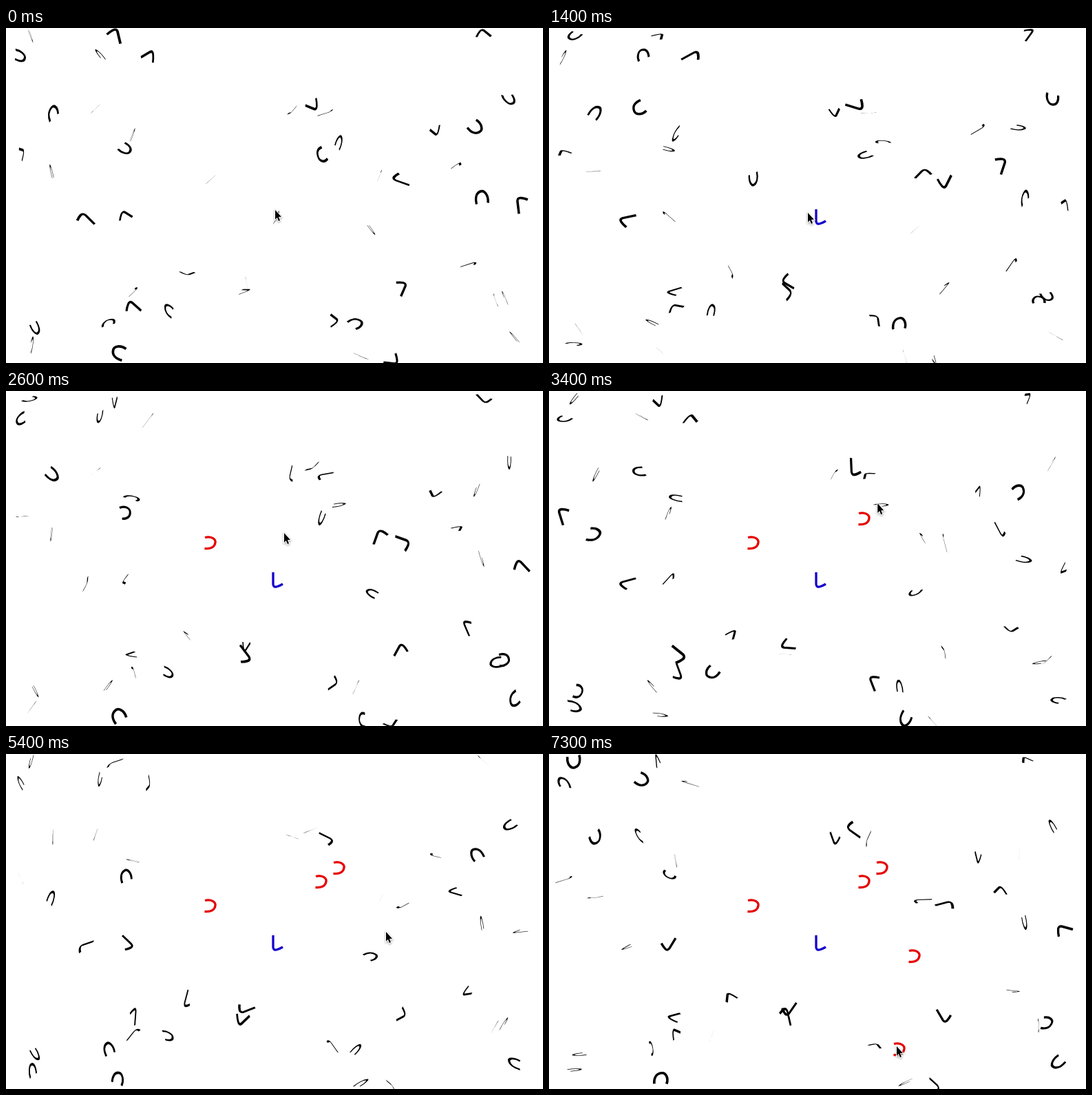
Recreate the animation shown at these times as an HTML page with a canvas. Size 780 by 486 pixels, loop 7400 ms.

```html
<!DOCTYPE html>
<html lang="en">
<head>
<meta charset="utf-8">
<style>
  html, body { margin: 0; width: 100%; height: 100%; overflow: hidden; background: #fff; }
  canvas { display: block; }
</style>
</head>
<body>
<canvas id="stage" width="780" height="486"></canvas>
<script>
const ctx = document.getElementById('stage').getContext('2d');
const LOOP = 7400, STEP = 100, TAU = 2 * Math.PI;

const arch = { path: new Path2D('M-8-7.5C1-10 8-5 7 0C6 6.5 0 9.5-8.5 8.5'), foundColor: '#e60000' };
const hook = { path: new Path2D('M-5-11L-5 6.5Q-4.5 11 0 10Q4 9 9 6'), foundColor: '#1400cc' };
const pointerPath = new Path2D('M0 0V13.8L2.9 10.9L4.9 16.1L7 15.2L5 10.1H9Z');

// Where the tumbling shapes that are never clicked sit
const archSpots = [
  [36, 12], [21, 41], [136, 38], [68, 122], [130, 117], [184, 155], [174, 176], [66, 208],
  [683, 145], [731, 104], [691, 245], [724, 390], [711, 394], [738, 448], [517, 477],
  [236, 409], [149, 427], [163, 470], [43, 436], [38, 458]
];
const hookSpots = [
  [158, 13], [206, 43], [694, 10], [22, 182], [116, 279], [174, 274], [415, 120], [444, 110],
  [464, 123], [543, 213], [575, 220], [623, 147], [655, 200], [749, 257], [672, 344], [573, 378],
  [474, 424], [559, 481], [349, 368], [344, 382], [264, 355], [185, 382], [185, 407]
];

// Shapes that the pointer visits and clicks
const finds = [
  { at: 700, x: 393, y: 274, kind: hook },
  { at: 2000, x: 297, y: 220, kind: arch },
  { at: 3000, x: 458, y: 185, kind: arch },
  { at: 3500, x: 484, y: 165, kind: arch },
  { at: 5900, x: 531, y: 293, kind: arch },
  { at: 7000, x: 509, y: 428, kind: arch }
];
const detours = [
  { at: 0, x: 391, y: 264 }, { at: 1400, x: 376, y: 268 }, { at: 2600, x: 404, y: 206 },
  { at: 4200, x: 425, y: 124 }, { at: 5400, x: 552, y: 258 }, { at: 6500, x: 509, y: 388 },
  { at: LOOP, x: 505, y: 424 }
];
const pointerStops = finds.map(({ at, x, y }) => ({ at, x: x - 4, y: y - 4 }))
  .concat(detours).sort((a, b) => a.at - b.at);

const shapes = [
  ...finds,
  ...archSpots.map(([x, y]) => ({ at: Infinity, x, y, kind: arch })),
  ...hookSpots.map(([x, y]) => ({ at: Infinity, x, y, kind: hook }))
];

let seed = 7;
function random() {
  seed = (seed * 16807) % 2147483647;
  return seed / 2147483647;
}

// A random starting angle and a random signed speed, in radians and seconds
function randomTurn() {
  const start = random() * TAU;
  const speed = (1 + 2 * random()) * (random() < 0.5 ? -1 : 1);
  return seconds => start + speed * seconds;
}

for (const shape of shapes) {
  shape.spin = randomTurn();
  shape.pitch = randomTurn();
  shape.yaw = randomTurn();
  shape.size = 1 + 0.2 * random();
}

// Flattened view of a shape turned about its x, y and z axes
function tumble({ spin, pitch, yaw, size }, seconds) {
  const p = pitch(seconds), w = yaw(seconds);
  ctx.rotate(spin(seconds));
  ctx.transform(Math.cos(w), Math.sin(p) * Math.sin(w), 0, Math.cos(p), 0, 0);
  ctx.scale(size, size);
}

function drawShape(shape, ms) {
  const found = ms >= shape.at;
  ctx.setTransform(1, 0, 0, 1, shape.x, shape.y);
  if (!found) tumble(shape, ms / 1000);
  ctx.strokeStyle = found ? shape.kind.foundColor : '#000';
  ctx.lineWidth = 3.3;
  ctx.stroke(shape.kind.path);
}

function drawPointer(ms) {
  const next = pointerStops.findIndex(stop => stop.at > ms);
  const from = pointerStops[next - 1], to = pointerStops[next];
  const p = (ms - from.at) / (to.at - from.at), eased = p * p * (3 - 2 * p);
  ctx.setTransform(1, 0, 0, 1, from.x + (to.x - from.x) * eased, from.y + (to.y - from.y) * eased);
  ctx.save();
  ctx.shadowColor = 'rgba(0,0,0,.4)';
  ctx.shadowBlur = 3;
  ctx.shadowOffsetY = 1;
  ctx.strokeStyle = '#fff';
  ctx.lineWidth = 2;
  ctx.stroke(pointerPath);
  ctx.restore();
  ctx.fillStyle = '#000';
  ctx.fill(pointerPath);
}

function draw() {
  const ms = Math.floor(performance.now() % LOOP / STEP) * STEP;
  ctx.setTransform(1, 0, 0, 1, 0, 0);
  ctx.fillStyle = '#fff';
  ctx.fillRect(0, 0, 780, 486);
  for (const shape of shapes) drawShape(shape, ms);
  drawPointer(ms);
  requestAnimationFrame(draw);
}
draw();
</script>
</body>
</html>
```
